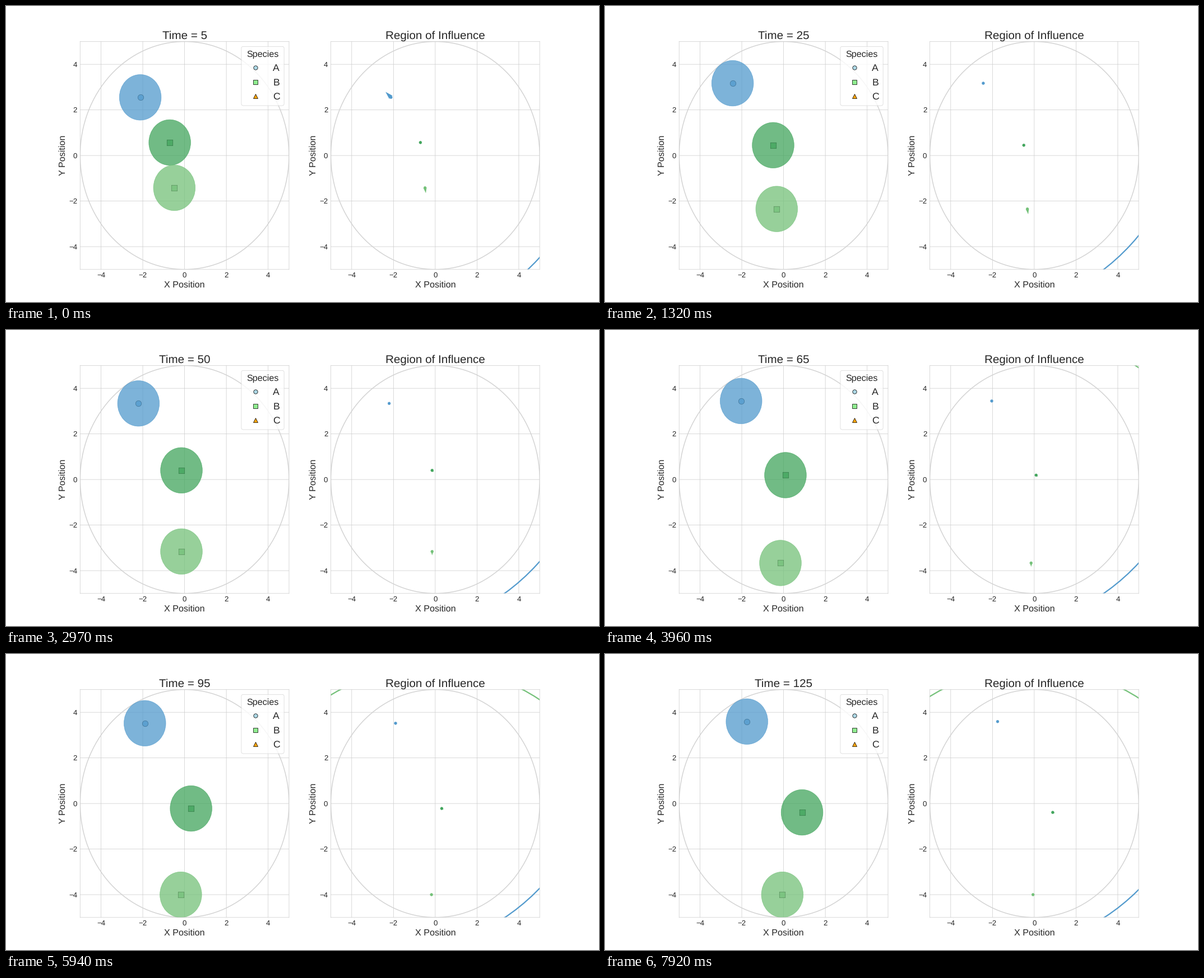
Animation, 1058 px wide and 529 px high, one loop 8000 ms. Source, as a matplotlib script:

```python
import matplotlib.pyplot as plt
import numpy as np
from matplotlib.animation import FuncAnimation
from matplotlib.colors import to_rgb
from matplotlib.lines import Line2D
from matplotlib.patches import Circle

LOOP_MS, TICK_MS, STEP_MS = 8000, 40, 330
STEPS = 25
WALL, REACH = 4.0, 10
INK, GRID = "0.15", "0.8"
COLORS = ["#529acd", "#41a55c", "#74c179"]
SHAPES = ["o", "s", "s"]

plt.rcParams.update({
    "font.family": "Liberation Sans",
    "text.color": INK,
    "text.hinting": "no_hinting",
    "path.snap": False,
    "axes.labelcolor": INK,
    "axes.edgecolor": GRID,
    "axes.linewidth": 1,
    "axes.axisbelow": True,
    "grid.color": GRID,
    "grid.linewidth": 1,
})

step = np.arange(STEPS + 1)


def ease(start, end):
    """Smooth rise from 0 to 1 between two steps."""
    u = np.clip((step - start) / (end - start), 0, 1)
    return u * u * (3 - 2 * u)


def slide():
    """One free step to the upper left, then a drift along the round wall."""
    angle = -0.665 + 0.17 * ease(2, 16.5) + 0.041 * ease(22, 24)
    track = WALL * np.column_stack([np.sin(angle), np.cos(angle)])
    track[0] = -2.12, 2.55
    track[1] = track[0] + (-0.26, 0.24)
    return track


def path(*points):
    """Straight runs between (step, x, y) points."""
    at, x, y = zip(*points)
    return np.column_stack([np.interp(step, at, x), np.interp(step, at, y)])


tracks = np.stack([
    slide(),
    path((0, -0.71, 0.57), (2, -0.64, 0.42), (6, -0.36, 0.48),
         (9, -0.15, 0.40), (14, 0.25, 0.05), (18, 0.31, -0.22),
         (25, 0.98, -0.42)),
    path((0, -0.49, -1.42), (6, -0.25, -2.81), (9, -0.15, -3.16),
         (14, -0.15, -WALL), (18, -0.18, -WALL), (25, -0.04, -WALL)),
], axis=1)

# Particles resting on the wall have no velocity.
velocity = np.diff(tracks, axis=0)
tracks = tracks[:STEPS]
velocity[np.linalg.norm(tracks, axis=2) > WALL - 0.05] = 0

fig, (left, right) = plt.subplots(1, 2, figsize=(20, 10), dpi=52.9)


def style(ax, title):
    ax.add_patch(Circle((0, 0), 5, fill=False, ec="lightgray", lw=2))
    ax.set(xlim=(-5, 5), ylim=(-5, 5))
    ax.set_xticks(range(-4, 5, 2))
    ax.set_yticks(range(-4, 5, 2))
    ax.tick_params(length=0, pad=7, labelsize=18, labelcolor=INK)
    ax.grid(True)
    ax.set_xlabel("X Position", fontsize=22)
    ax.set_ylabel("Y Position", fontsize=22)
    return ax.set_title(title, fontsize=28)


clock = style(left, "Time = 5")
style(right, "Region of Influence")

bodies, cores, rings = [], [], []
for color, shape, pos in zip(COLORS, SHAPES, tracks[0]):
    edge = 0.65 * np.array(to_rgb(color))
    bodies.append(left.add_patch(Circle(pos, 1, color=color, alpha=0.75)))
    cores.append(left.scatter(*pos, s=200, marker=shape, color=color,
                              edgecolor=edge, linewidth=1, alpha=0.75))
    rings.append(right.add_patch(
        Circle(pos, REACH, fill=False, ec=color, lw=3)))

dots = right.scatter(*tracks[0].T, s=45, c=COLORS, linewidths=0.5, zorder=3)
arrows = right.quiver(*tracks[0].T, *velocity[0].T, color=COLORS,
                      angles="xy", scale_units="xy", scale=1, zorder=3)


def key(label, marker, color):
    return Line2D([], [], ls="", marker=marker, ms=10, mfc=color,
                  mec="black", mew=1, label=label)


left.legend(
    handles=[key("A", "o", "lightblue"), key("B", "s", "lightgreen"),
             key("C", "^", "orange")],
    title="Species", fontsize=24, title_fontsize=22, loc="upper right",
    labelspacing=0.55)


def update(i):
    k = min((i * TICK_MS + TICK_MS - 1) // STEP_MS, STEPS - 1)
    clock.set_text(f"Time = {5 * (k + 1)}")
    for body, core, ring, pos in zip(bodies, cores, rings, tracks[k]):
        body.center = ring.center = tuple(pos)
        core.set_offsets([pos])
    dots.set_offsets(tracks[k])
    arrows.set_offsets(tracks[k])
    arrows.set_UVC(*velocity[k].T)
    return [clock, dots, arrows, *bodies, *cores, *rings]


anim = FuncAnimation(fig, update, frames=LOOP_MS // TICK_MS,
                     interval=TICK_MS, repeat=True, repeat_delay=0)
plt.show()
```
